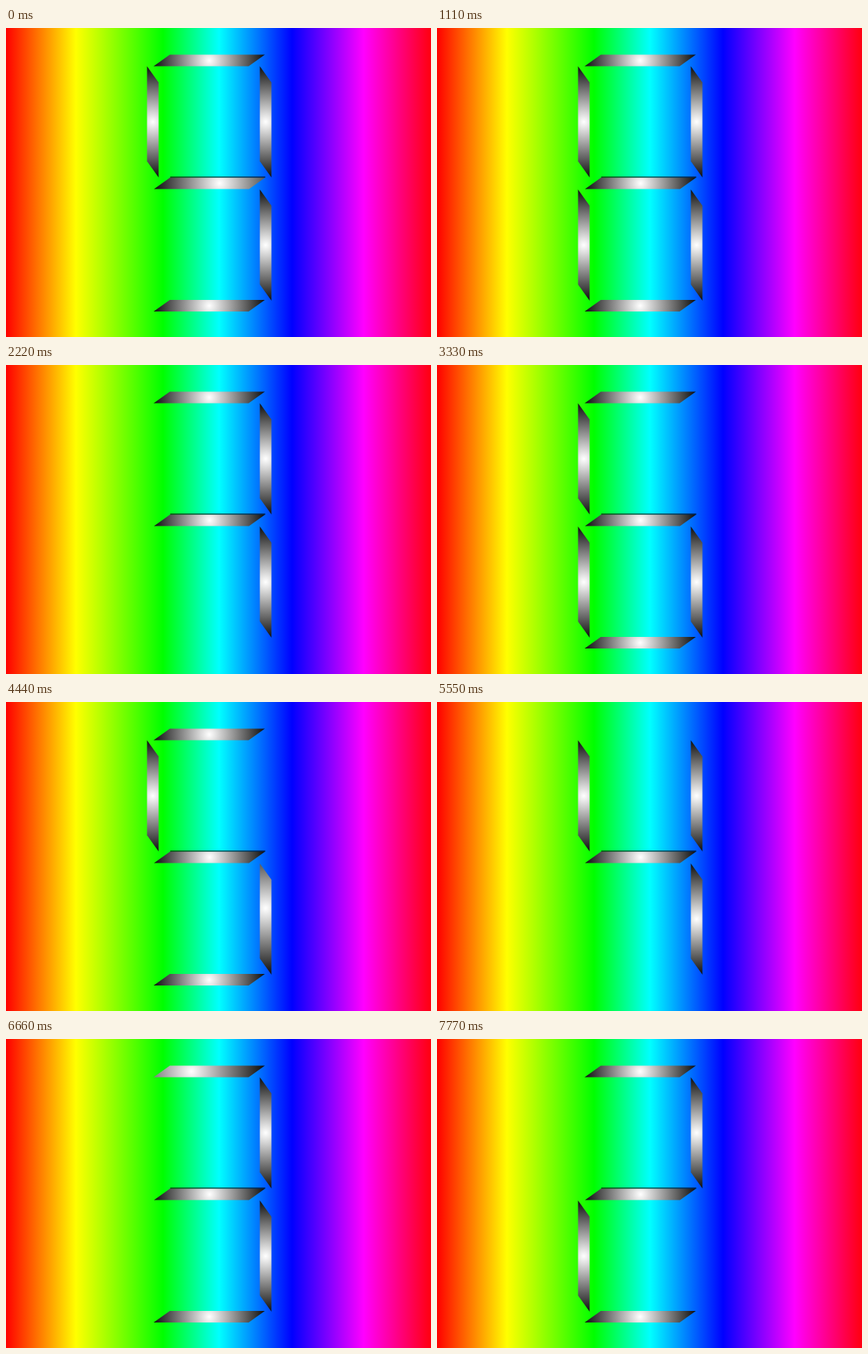
An HTML page with a canvas for the animation above (8000 ms loop, 550 by 400 pixels).

```html
<!DOCTYPE html>
<html lang="en">
<head>
<meta charset="utf-8">
<title>Countdown</title>
<style>
  html, body { margin: 0; width: 100%; height: 100%; overflow: hidden; }
  canvas { display: block; width: 550px; height: 400px; }
</style>
</head>
<body>
<canvas id="stage" width="550" height="400"></canvas>
<script>
const ctx = document.getElementById('stage').getContext('2d');
const LOOP = 8000, STEP = 1110, RADIUS = 76;

// Each step lists the lit segments; `shine` moves a highlight along its segment.
const steps = [
  { lit: 'abcdfg', shine: { g: 13 } },
  { lit: 'abcdefg' },
  { lit: 'abcg' },
  { lit: 'acdefg' },
  { lit: 'acdfg', shine: { c: -14 } },
  { lit: 'bcfg' },
  { lit: 'abcdg', shine: { a: -23 } },
  { lit: 'abdeg' }
];

const bar = (x, y) => ({
  points: [[x, y + 15], [x + 21, y], [x + 144, y], [x + 123, y + 15]],
  center: [x + 72, y + 7.5],
  axis: [1, 0]
});
const post = (x, y) => ({
  points: [[x, y], [x + 15, y + 21], [x + 15, y + 144], [x, y + 123]],
  center: [x + 7.5, y + 72],
  axis: [0, 1]
});
const segments = {
  a: bar(191, 34.5),
  b: post(328.5, 49.5),
  c: post(328.5, 209),
  d: bar(191, 352),
  e: post(182.5, 209),
  f: post(182.5, 49.5),
  g: { ...bar(191.5, 193.5), topEdge: true }
};

const rainbow = ctx.createLinearGradient(0, 0, 555, 0);
[[0, '#f00'], [0.163, '#ff0'], [0.366, '#0f0'], [0.497, '#0ff'],
 [0.667, '#00f'], [0.834, '#f0f'], [1, '#f00']]
  .forEach(([at, color]) => rainbow.addColorStop(at, color));

function drawSegment({ points, center, axis, topEdge }, shift = 0) {
  const [x, y] = center.map((c, i) => c + axis[i] * shift);
  const metal = ctx.createRadialGradient(x, y, 0, x, y, RADIUS + Math.abs(shift));
  metal.addColorStop(0, '#fff');
  metal.addColorStop(1, '#000');
  ctx.beginPath();
  points.forEach(p => ctx.lineTo(...p));
  ctx.closePath();
  ctx.fillStyle = metal;
  ctx.fill();
  if (topEdge) {
    const [, [left, top], [right]] = points;
    ctx.fillStyle = '#000';
    ctx.fillRect(left, top - 1, right - left, 1);
  }
}

function draw(time) {
  const { lit, shine = {} } = steps[Math.floor(time % LOOP / STEP)];
  ctx.fillStyle = rainbow;
  ctx.fillRect(0, 0, 550, 400);
  for (const name of lit) drawSegment(segments[name], shine[name]);
}

const start = performance.now();
function tick() {
  draw(performance.now() - start);
  requestAnimationFrame(tick);
}
tick();
</script>
</body>
</html>
```
